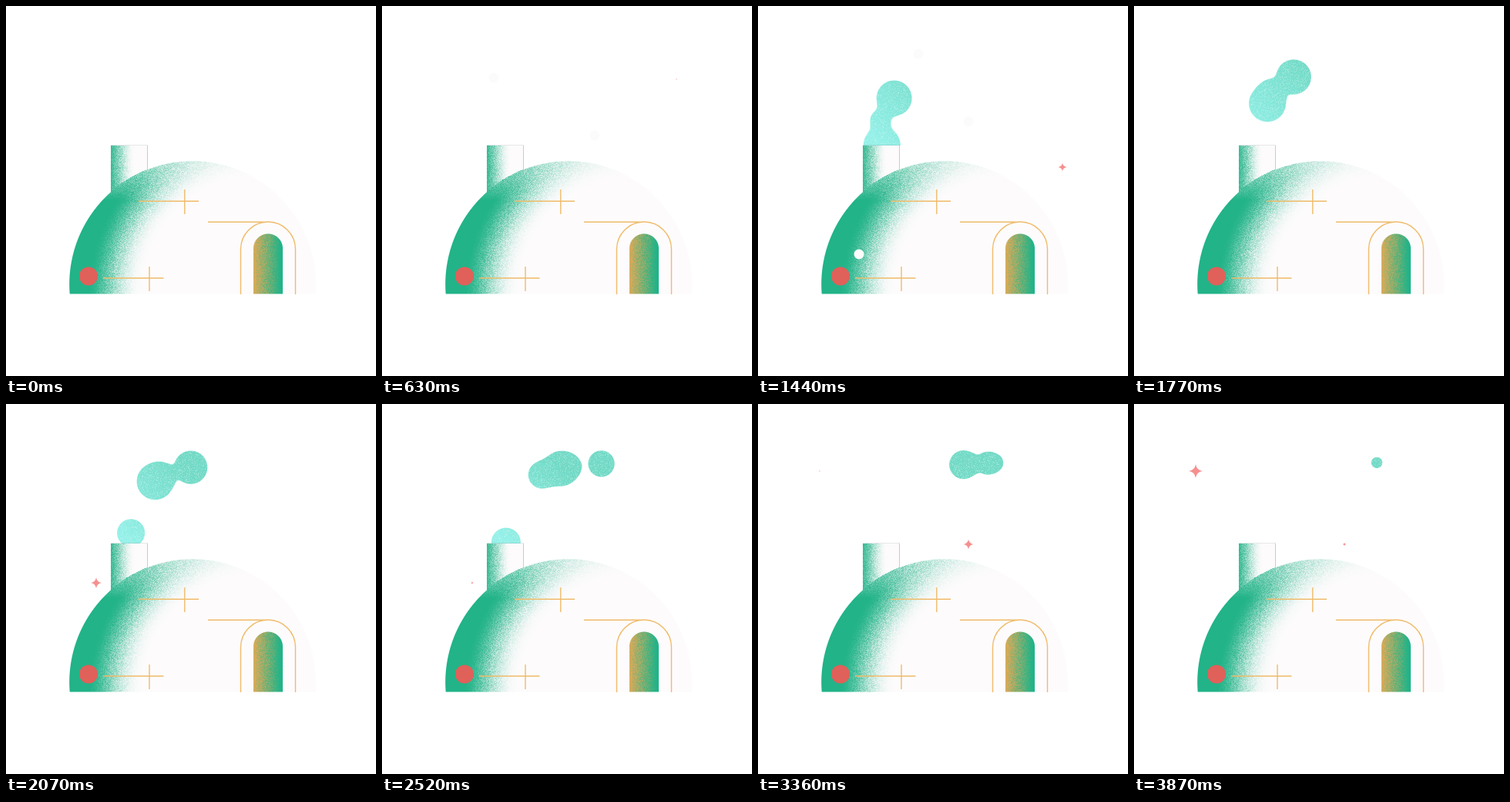
Animation, 480 px wide and 480 px high, one loop 3900 ms. Source, as an HTML page with a canvas:

```html
<!DOCTYPE html>
<html lang="en">
<head>
<meta charset="utf-8">
<title>Smoking dome</title>
<style>
  html, body { margin: 0; width: 100%; height: 100%; overflow: hidden; background: #fff; }
  canvas { display: block; width: 480px; height: 480px; }
</style>
</head>
<body>
<canvas id="stage" width="480" height="480"></canvas>
<script>
const SIZE = 480, LOOP = 3900, STEP = 30, GRAINS = 6;
const GREEN = [34, 179, 136], PAPER = [253, 251, 252], AMBER = [232, 170, 86];
const MINT = [146, 240, 232], TEAL = [112, 217, 197], PALE = [215, 250, 242];
const LINE = '#f0bb6b', PINK = '#f5908f', RED = '#e0605a', FLAKE = '#fcfbfb';

const ctx = document.getElementById('stage').getContext('2d');
const clamp = v => Math.max(0, Math.min(1, v));
const smooth = (a, b, v) => { const u = clamp((v - a) / (b - a)); return u * u * (3 - 2 * u); };
const mix = (a, b, u) => a.map((v, i) => v + (b[i] - v) * u);
// Rises and falls around its peak time
const swell = (t, peak, life) => Math.sin(Math.PI * clamp((t - peak) / life + 0.5));
// A tone roughened by noise, strongest in the middle of a fade
const grainy = (tone, n) => clamp(tone + (n - 0.5) * 1.6 * tone * (1 - tone));

function random(seed) {
  return () => {
    seed = (seed + 0x6D2B79F5) | 0;
    let v = Math.imul(seed ^ (seed >>> 15), 1 | seed);
    v = (v + Math.imul(v ^ (v >>> 7), 61 | v)) ^ v;
    return ((v ^ (v >>> 14)) >>> 0) / 4294967296;
  };
}

// Canvas filled by paint(x, y, noise) -> [color, alpha] or nothing
function raster(x0, y0, w, h, seed, paint) {
  const canvas = document.createElement('canvas');
  canvas.width = w;
  canvas.height = h;
  const c = canvas.getContext('2d'), img = c.createImageData(w, h), rnd = random(seed);
  for (let i = 0; i < w * h; i++) {
    const pixel = paint(x0 + i % w + 0.5, y0 + Math.floor(i / w) + 0.5, rnd());
    if (pixel) img.data.set([...pixel[0], pixel[1] * 255], i * 4);
  }
  c.putImageData(img, 0, 0);
  return canvas;
}

function domeColor(x, y, n) {
  const shade = smooth(150, 225, Math.hypot(x - 331, y - 374)) ** 1.5;
  const topFade = Math.min(1, 0.35 + Math.max(0, y - 200) / 80);
  return mix(PAPER, GREEN, grainy(shade * topFade, n));
}

function doorColor(x, n) {
  return mix(GREEN, AMBER, grainy(0.95 * clamp((356 - x) / 36), n));
}

function chimneyColor(x, n) {
  return mix(PAPER, GREEN, grainy(0.9 * (1 - smooth(132, 168, x)) ** 1.2, n));
}

const HOUSE = [80, 181, 324, 193];
function paintHouse(x, y, n) {
  const dome = clamp(160.3 - Math.hypot(x - 242, y - 361));
  const door = clamp(19.5 - Math.hypot(x - 340, Math.min(0, y - 314.5)));
  const chimney = x > 136 && x < 184 && y < 245;
  if (!dome) return chimney && [chimneyColor(x, n), 1];
  const color = mix(domeColor(x, y, n), doorColor(x, n), door);
  return [color, (chimney ? 1 : dome) * clamp(374 - y)];
}
const houses = Array.from({ length: GRAINS }, (_, i) => raster(...HOUSE, i * 977 + 5, paintHouse));

// Every puff drifts along one curve, slowing and shrinking: [birth, life, radius, shift]
const puffs = [
  [1040, 2200, 23, 0], [1180, 2600, 13, -7], [1340, 2700, 24, 0],
  [1970, 1650, 18, 0], [2460, 1550, 19, 0], [2650, 1200, 17, 0]
];
const DRIFT = [[160, 205], [160, 85], [210, 80], [317, 76]];

function bezier([a, b, c, d], u) {
  const v = 1 - u;
  return [0, 1].map(k =>
    v ** 3 * a[k] + 3 * v * v * u * b[k] + 3 * v * u * u * c[k] + u ** 3 * d[k]);
}

function puffAt(t, [birth, life, radius, shift]) {
  const s = clamp((t - birth) / life);
  const [x, y] = bezier(DRIFT, 1 - (1 - s) ** 2);
  return { x: x + shift, y, r: s && radius * (1 - s ** 4) ** 1.3 };
}

// Union of two distances with a soft neck
function join(a, b) {
  const k = 13, h = Math.max(k - Math.abs(a - b), 0) / k;
  return Math.min(a, b) - h * h * k / 4;
}

const SKY = [120, 40, 220, 141];
function drawSmoke(t, seed) {
  const balls = puffs.map(p => puffAt(t, p)).filter(b => b.r > 0.5);
  if (!balls.length) return;
  const cloud = raster(...SKY, seed, (x, y, n) => {
    const dist = balls.map(b => Math.hypot(x - b.x, y - b.y) - b.r).reduce(join);
    if (dist > 0.5) return null;
    const base = mix(MINT, TEAL, clamp((x - y + 20) / 170));
    return [mix(base, PALE, 0.5 * n ** 4), clamp(0.5 - dist)];
  });
  ctx.drawImage(cloud, SKY[0], SKY[1]);
}

// Sparkles: [x, y, radius, peak time]
const stars = [
  [382, 95, 7.5, 960], [395, 209, 16, 1160], [117, 232, 8.5, 2210],
  [207, 121, 8, 2930], [273, 182, 10, 3560], [80, 87, 12, 3700]
];
// Pale flakes: [x, y, peak time]
const flakes = [
  [145, 93, 650], [276, 168, 650], [208, 62, 1450], [273, 150, 1450],
  [131, 322, 1450], [228, 88, 2950], [406, 56, 2950]
];

function drawStar(x, y, r) {
  const polar = (turn, len) => {
    const a = turn * Math.PI / 2;
    return [x + len * Math.cos(a), y + len * Math.sin(a)];
  };
  ctx.fillStyle = PINK;
  ctx.beginPath();
  ctx.moveTo(...polar(0, r));
  for (let i = 1; i <= 4; i++) ctx.quadraticCurveTo(...polar(i - 0.5, r * 0.2), ...polar(i, r));
  ctx.fill();
}

function disc(x, y, r, color) {
  ctx.fillStyle = color;
  ctx.beginPath();
  ctx.arc(x, y, r, 0, 7);
  ctx.fill();
}

function stroke(path, color, width) {
  ctx.strokeStyle = color;
  ctx.lineWidth = width;
  ctx.stroke(new Path2D(path));
}

function drawLines() {
  stroke('M183.5 181V212', 'rgba(130,135,140,.5)', 0.8);
  stroke('M136 180.5H184', 'rgba(130,135,140,.25)', 0.8);
  stroke('M172 253.3H250M231.8 238V270M126 353H204.5M186 338V370', LINE, 1.4);
  stroke('M262 280.2H340M304.5 374V315.5A35.5 35.5 0 0 1 375.5 315.5V374', LINE, 1.4);
}

function draw(t) {
  const variant = (t / STEP) % GRAINS;
  ctx.fillStyle = '#fff';
  ctx.fillRect(0, 0, SIZE, SIZE);
  drawSmoke(t, variant + 41);
  ctx.drawImage(houses[variant], HOUSE[0], HOUSE[1]);
  for (const [x, y, peak] of flakes) disc(x, y, 6.5 * swell(t, peak, 500), FLAKE);
  drawLines();
  disc(107, 350.5, 12, RED);
  for (const [x, y, r, peak] of stars) drawStar(x, y, r * swell(t, peak, 720));
}

const began = performance.now();
let shown = -1;
function play() {
  const t = Math.floor(((performance.now() - began) % LOOP) / STEP) * STEP;
  // The opening pose holds for three steps
  const pose = t < 3 * STEP ? 0 : t;
  if (pose !== shown) draw(shown = pose);
  requestAnimationFrame(play);
}
play();
</script>
</body>
</html>
```
